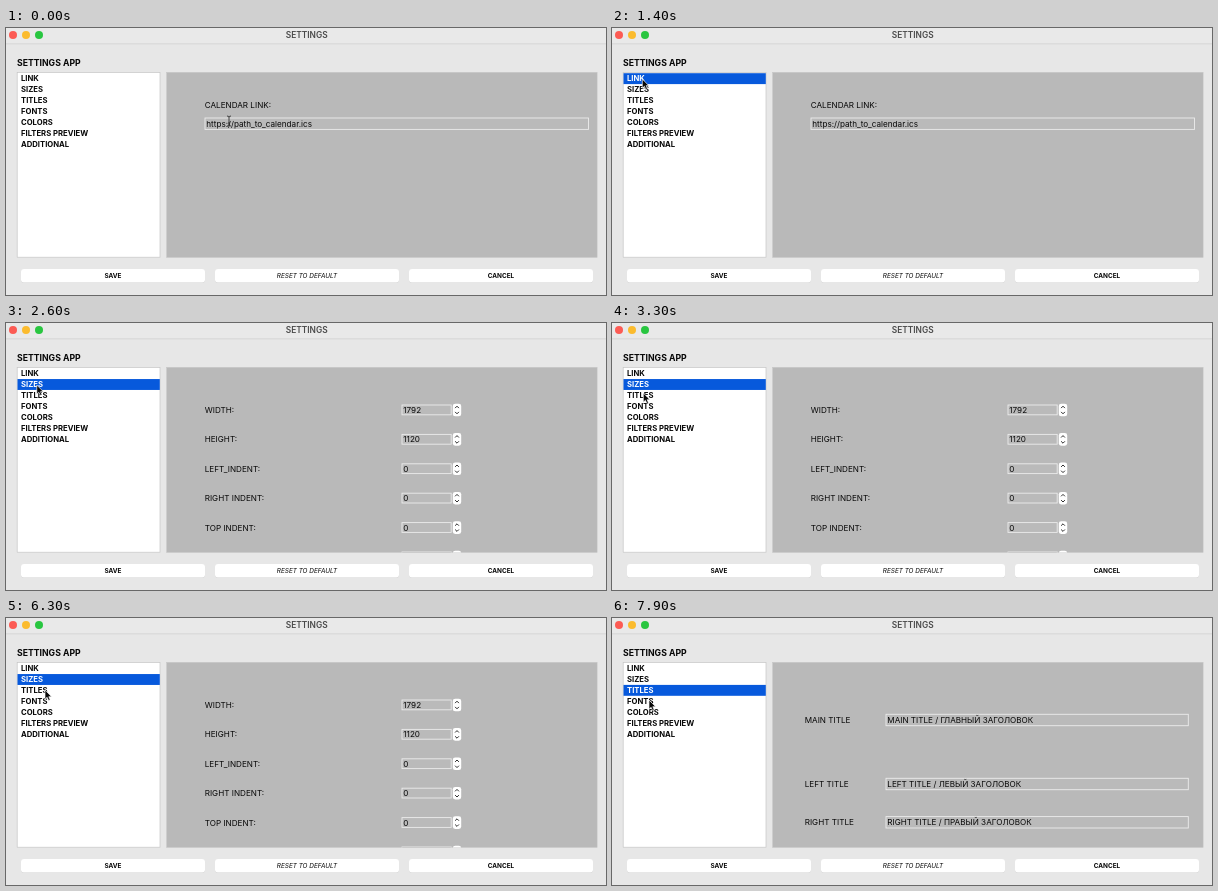
An HTML page that plays this animation: 600 by 267 pixels, repeating every 8000 ms.

```html
<!DOCTYPE html>
<html lang="en">
<head>
<meta charset="utf-8">
<title>Settings</title>
<style>
  html, body { margin: 0; width: 100%; height: 100%; overflow: hidden; background: #e7e7e7; }
  svg { display: block; width: 600px; height: 267px; }
  text { font-family: Inter, Roboto, sans-serif; font-size: 8.15px; fill: #080808; }
  .title { font-size: 8.4px; font-weight: 600; fill: #4a4a4a; }
  .heading { font-size: 8.7px; font-weight: 700; }
  .item { font-size: 7.7px; font-weight: 700; }
  .item.on { fill: #fff; }
  .button { font-size: 6.4px; font-weight: 700; }
  .reset { font-size: 6.4px; font-style: italic; }
  .field { fill: #bababa; stroke: #ececec; stroke-width: .9; }
</style>
</head>
<body>
<svg id="stage" viewBox="0 0 600 267">
  <defs>
    <clipPath id="panelClip"><rect x="161" y="44.5" width="430" height="185"/></clipPath>
  </defs>
  <rect width="600" height="267" fill="#e7e7e7"/>
  <rect width="600" height="15.5" fill="#e9e9e9"/>
  <rect y="15.5" width="600" height=".8" fill="#d2d2d2"/>
  <circle cx="7" cy="7" r="4" fill="#fc5b54"/>
  <circle cx="20" cy="7" r="4" fill="#fbbb2e"/>
  <circle cx="33" cy="7" r="4" fill="#29c640"/>
  <rect x="11.2" y="44.5" width="142.8" height="184.7" fill="#fff" stroke="#c6c6c6" stroke-width=".7"/>
  <rect x="160.7" y="44.4" width="430.4" height="185" fill="#b9b9b9" stroke="#c3c3c3" stroke-width=".5"/>
  <rect id="highlight" x="11.5" width="142.3" height="10.9" fill="#0759dc"/>
  <g id="chrome"></g>
  <g id="pages" clip-path="url(#panelClip)"></g>
  <path id="arrow" d="M0 0V9.2L2.1 7.3L3.6 10.5L5.2 9.8L3.8 6.7H6.6Z" fill="#080808" stroke="#fff" stroke-width=".65" stroke-linejoin="round"/>
  <path id="beam" d="M-2 -5Q0 -5 0 -3.6Q0 -5 2 -5M0 -3.6V4M-2 5Q0 5 0 3.6Q0 5 2 5M-1 2H1" fill="none" stroke="#222" stroke-width=".8"/>
</svg>
<script>
const LOOP = 8000, STEP = 100;
const byId = id => document.getElementById(id);

function add(parent, tag, attrs, content) {
  const node = document.createElementNS('http://www.w3.org/2000/svg', tag);
  for (const key in attrs) node.setAttribute(key, attrs[key]);
  if (content) node.textContent = content;
  return parent.appendChild(node);
}

// Places text so that its capitals are centred on midY.
function label(parent, content, x, midY, className = '', size = 8.15, anchor = 'start') {
  return add(parent, 'text', { x, y: midY + size * .364, class: className, 'text-anchor': anchor }, content);
}

function field(parent, x, y, width, height, content) {
  add(parent, 'rect', { x, y, width, height, class: 'field' });
  label(parent, content, x + 1.3, y + height / 2 + .2);
}

const chrome = byId('chrome');
label(chrome, 'SETTINGS', 300.7, 7, 'title', 8.4, 'middle');
label(chrome, 'SETTINGS APP', 11, 34.6, 'heading', 8.7);

const rowY = i => 50.6 + i * 10.85;
const items = ['LINK', 'SIZES', 'TITLES', 'FONTS', 'COLORS', 'FILTERS PREVIEW', 'ADDITIONAL']
  .map((name, i) => label(chrome, name, 15, rowY(i), 'item', 7.7));

['SAVE', 'RESET TO DEFAULT', 'CANCEL'].forEach((name, i) => {
  const x = 15 + i * 194;
  add(chrome, 'rect', { x, y: 241.6, width: 184, height: 13.4, rx: 3, fill: '#d0d0d0' });
  add(chrome, 'rect', { x, y: 241, width: 184, height: 13.4, rx: 3, fill: '#fff' });
  label(chrome, name, x + 92, 247.6, i === 1 ? 'reset' : 'button', 6.4, 'middle');
});

const pages = ['link', 'sizes', 'titles'].map(() => add(byId('pages'), 'g', {}));
const [linkPage, sizesPage, titlesPage] = pages;

label(linkPage, 'CALENDAR LINK:', 198.7, 77.2);
field(linkPage, 199, 90, 383.5, 11.4, 'https://path_to_calendar.ics');

[['WIDTH:', '1792'], ['HEIGHT:', '1120'], ['LEFT_INDENT:', '0'], ['RIGHT INDENT:', '0'],
 ['TOP INDENT:', '0'], ['BOTTOM INDENT:', '0']].forEach(([name, value], i) => {
  const y = 87 + i * 29.4;
  label(sizesPage, name, 198.7, y + .1);
  field(sizesPage, 396, y - 5, 49.2, 9.8, value);
  add(sizesPage, 'rect', { x: 446.8, y: y - 6.3, width: 8.4, height: 12.6, rx: 2.4, fill: '#fff' });
  add(sizesPage, 'path', {
    d: `M449.1 ${y - 1.9}l1.9 -1.9l1.9 1.9M449.1 ${y + 1.9}l1.9 1.9l1.9 -1.9`,
    fill: 'none', stroke: '#222', 'stroke-width': .95
  });
});

[['MAIN', 'ГЛАВНЫЙ', 102], ['LEFT', 'ЛЕВЫЙ', 166], ['RIGHT', 'ПРАВЫЙ', 204.3]].forEach(([side, russian, y]) => {
  label(titlesPage, side + ' TITLE', 192.7, y + .2);
  field(titlesPage, 274, y - 5.7, 302.3, 11.4, `${side} TITLE / ${russian} ЗАГОЛОВОК`);
});

// Pointer waypoints: time, x, y
const route = [
  [0, 223, 93], [100, 223, 93], [300, 43, 51], [400, 43, 51], [900, 30.3, 51],
  [2000, 30.3, 51], [2500, 30.7, 62], [2900, 31, 62], [3100, 24, 67], [3300, 31.3, 70],
  [4100, 31.3, 70], [4400, 292, 174], [5700, 292, 174], [6000, 38.5, 71],
  [6300, 39, 72], [7700, 39, 72], [7900, 37, 82], [LOOP, 37, 82]
];

function pointerAt(t) {
  const next = route.findIndex(point => point[0] > t);
  const [t0, x0, y0] = route[next - 1], [t1, x1, y1] = route[next];
  const k = (t - t0) / (t1 - t0);
  return [x0 + (x1 - x0) * k, y0 + (y1 - y0) * k];
}

function show(node, visible) {
  node.style.display = visible ? '' : 'none';
}

function draw(now) {
  const t = Math.floor(now % LOOP / STEP) * STEP;
  const selected = t < 1400 ? -1 : t < 2600 ? 0 : t < 6400 ? 1 : 2;
  const typing = t < 200;
  show(byId('highlight'), selected >= 0);
  byId('highlight').setAttribute('y', rowY(selected) - 5.4);
  items.forEach((item, i) => item.classList.toggle('on', i === selected));
  pages.forEach((page, i) => show(page, i === Math.max(selected, 0)));
  show(byId('beam'), typing);
  show(byId('arrow'), !typing);
  byId(typing ? 'beam' : 'arrow').setAttribute('transform', `translate(${pointerAt(t)})`);
}

const start = performance.now();
function tick() {
  draw(performance.now() - start);
  requestAnimationFrame(tick);
}
tick();
</script>
</body>
</html>
```
